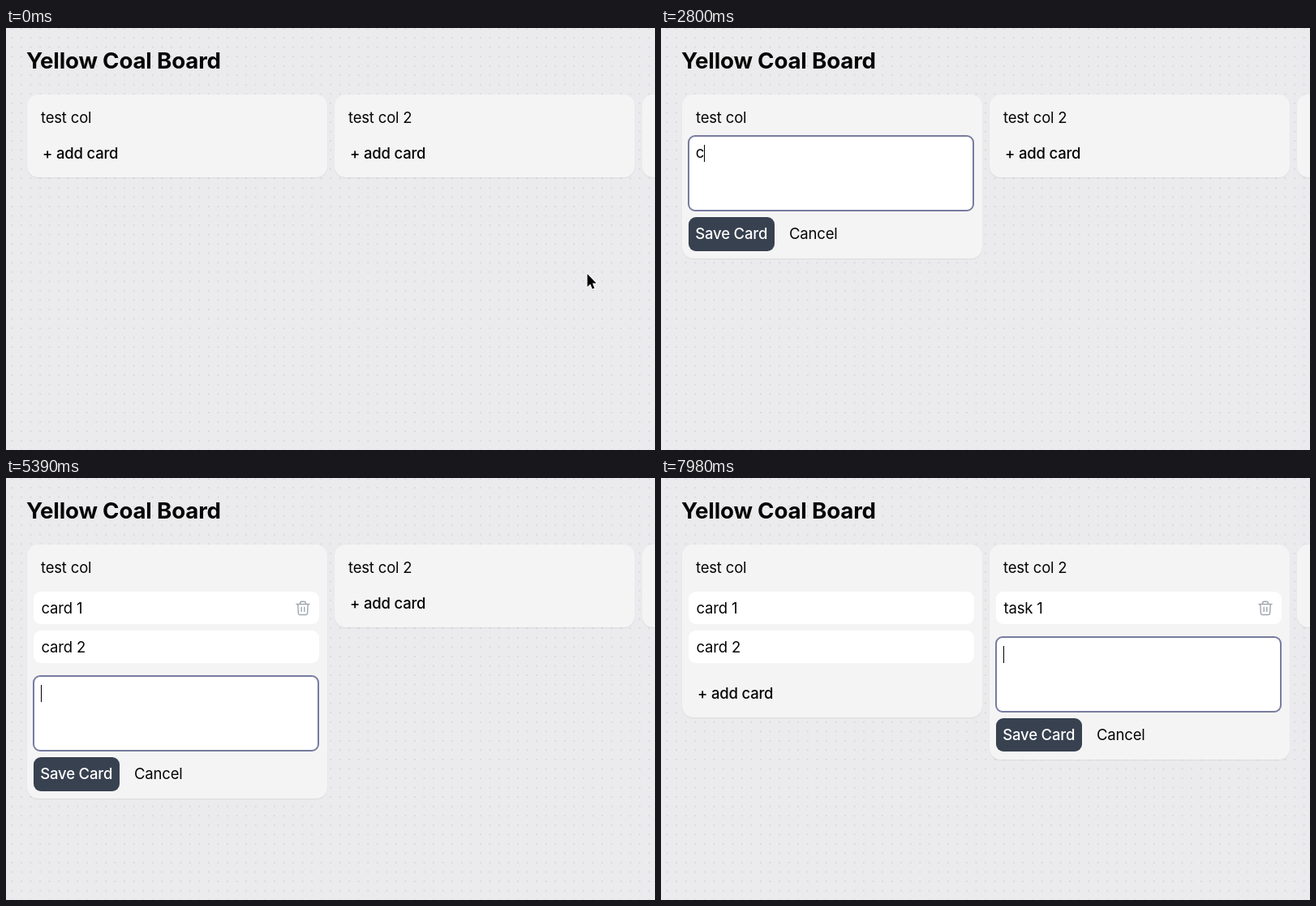
These frames come from a looping animation (800 px wide and 520 px high, 8000 ms). An HTML page:

```html
<!DOCTYPE html>
<html lang="en">
<head>
<meta charset="utf-8">
<title>Yellow Coal Board</title>
<style>
  html, body { margin: 0; width: 100%; height: 100%; overflow: hidden; }
  #stage {
    position: relative; width: 800px; height: 520px; overflow: hidden;
    background: #ebebed radial-gradient(circle, #d7d7db .6px, transparent 1.3px) 1.72px -5.28px / 11.56px 11.56px;
    font: 400 18.5px/24px Inter, "Liberation Sans", sans-serif;
    font-optical-sizing: none; letter-spacing: -.01em; color: #050505;
  }
  #stage * { box-sizing: border-box; }
  #stage div, #cursor { position: absolute; white-space: pre; }
  #stage .title { left: 25px; top: 22px; font-size: 27.7px; line-height: 36px; font-weight: 700; }
  .column {
    top: 82px; width: 370.5px; border-radius: 14px; background: #f4f4f4;
    box-shadow: 0 1px 1.5px rgba(0, 0, 0, .07);
  }
  .name { left: 17.5px; top: 16px; }
  .card {
    left: 8.5px; width: 352px; height: 40px; border-radius: 9px; background: #fff;
    padding-left: 9.5px; line-height: 40px;
  }
  .card svg { position: absolute; left: 323px; top: 10.5px; }
  .add { left: 19.5px; font-weight: 500; }
  .field {
    left: 7.5px; width: 353px; height: 94px; border: 2px solid #777c9f; border-radius: 9px;
    background: #fff; padding: 7px 0 0 7.7px;
  }
  .caret { display: inline-block; width: 1.4px; height: 21px; margin-right: -2px; vertical-align: -5px; background: #000; }
  .save {
    left: 8.5px; width: 106px; height: 41.5px; border-radius: 9px; background: #384150;
    color: #fff; font-weight: 500; padding-left: 8.3px; line-height: 41.5px;
  }
  .cancel { left: 132.5px; line-height: 41.5px; }
  #cursor { left: 0; top: 0; overflow: visible; }
</style>
</head>
<body>
<div id="stage">
  <div class="title">Yellow Coal Board</div>
  <div id="board"></div>
  <svg id="cursor" width="24" height="24">
    <path id="arrow" d="M.6 1V17L4.3 13.6 6.8 19.6 9.4 18.5 6.9 12.6H11.6Z" fill="#000" stroke="#fff" stroke-width="2" paint-order="stroke" stroke-linejoin="round"/>
    <path id="beam" d="M-3-9Q0-9 0-7Q0-9 3-9M0-7V7M-3 9Q0 9 0 7Q0 9 3 9" fill="none" stroke="#222" stroke-width="1.3"/>
  </svg>
</div>
<script>
const LOOP = 8000, STEP = 70, BLINK = 490;
const LEFT_OPEN = 1890, RIGHT_OPEN = 6230;

// Each entry: column, text, key press times, time of saving
const entries = [
  { col: 0, text: "card 1", keys: [2800, 2870, 3080, 3290, 3430, 3640], saved: 3850 },
  { col: 0, text: "card 2", keys: [4270, 4410, 4550, 4830, 4970, 5180], saved: 5390 },
  { col: 1, text: "task 1", keys: [6860, 7000, 7140, 7280, 7420, 7560], saved: 7840 }
];
const actions = [LEFT_OPEN, RIGHT_OPEN, ...entries.flatMap(e => e.keys)].sort((a, b) => a - b);

const path = [
  [0, 716, 302], [350, 716, 302], [630, 560, 268], [700, 560, 268], [1120, 244, 186],
  [1190, 240, 185], [1330, 230, 185], [1470, 170, 171], [1540, 170, 171],
  [1820, 92, 152], [5810, 92, 152], [6160, 470, 155], [LOOP, 470, 155]
];

const columns = [
  { x: 25.5, name: "test col", open: t => t >= LEFT_OPEN && t < RIGHT_OPEN },
  { x: 404.5, name: "test col 2", open: t => t >= RIGHT_OPEN },
  { x: 783.5, name: "", open: () => false }
];

const trash = `<svg width="18" height="19" fill="none" stroke="#a1a5ae" stroke-width="1.4" stroke-linecap="round" stroke-linejoin="round">
<path d="M1 4.5H17M5.7 4.5V2.8Q5.7 1.2 7.2 1.2H10.8Q12.3 1.2 12.3 2.8V4.5M2.8 4.5L3.4 15.8Q3.5 17.5 5.2 17.5H12.8Q14.5 17.5 14.6 15.8L15.2 4.5M7.2 8.3V13.4M10.8 8.3V13.4"/></svg>`;

const box = (cls, top, content) => `<div class="${cls}" style="top:${top}px">${content}</div>`;

function pointer(t) {
  const i = Math.max(1, path.findIndex(p => p[0] >= t));
  const [t0, x0, y0] = path[i - 1], [t1, x1, y1] = path[i];
  const k = (t - t0) / (t1 - t0);
  return [x0 + (x1 - x0) * k, y0 + (y1 - y0) * k];
}

function caret(t) {
  const last = actions.filter(a => a <= t).pop();
  return Math.floor((t - last) / BLINK) % 2 ? "" : '<span class="caret"></span>';
}

function columnHtml(col, index, t, mouse) {
  const own = entries.filter(e => e.col === index);
  const cards = own.filter(e => t >= e.saved);
  const n = cards.length;
  let html = box("name", 16, col.name), height;

  cards.forEach((card, i) => {
    const top = 58 + i * 48.4;
    const dx = mouse[0] - col.x - 8.5, dy = mouse[1] - 82 - top;
    const hover = dx > 0 && dx < 352 && dy > 0 && dy < 40;
    html += box("card", top, card.text + (hover ? trash : ""));
  });

  if (col.open(t)) {
    const top = n ? 64 + n * 48.7 : 50;
    const draft = own.find(e => t < e.saved);
    const typed = draft ? draft.text.slice(0, draft.keys.filter(k => k <= t).length) : "";
    html += box("field", top, typed + caret(t));
    html += box("save", top + 101, "Save Card") + box("cancel", top + 101, "Cancel");
    height = top + 152;
  } else {
    const top = n ? 74 + n * 48.5 : 60;
    html += box("add", top, col.name && "+ add card");
    height = top + 42;
  }
  return `<div class="column" style="left:${col.x}px;height:${height}px">${html}</div>`;
}

const board = document.getElementById("board");
const cursor = document.getElementById("cursor");
const arrow = document.getElementById("arrow");
const beam = document.getElementById("beam");
const start = performance.now();
let shown = "";

function render(now) {
  const time = Math.max(0, now - start) % LOOP;
  const t = Math.floor(time / STEP) * STEP;
  const mouse = pointer(t);
  const html = columns.map((col, i) => columnHtml(col, i, t, mouse)).join("");
  if (html !== shown) board.innerHTML = shown = html;

  const typing = (t >= 2800 && t < 5880) || t >= 6860;
  const overField = (t >= LEFT_OPEN && t < 2800) || t >= RIGHT_OPEN;
  cursor.style.transform = `translate(${mouse[0]}px, ${mouse[1]}px)`;
  cursor.style.visibility = typing ? "hidden" : "visible";
  arrow.style.display = overField ? "none" : "";
  beam.style.display = overField ? "" : "none";
  requestAnimationFrame(render);
}
render(start);
</script>
</body>
</html>
```
